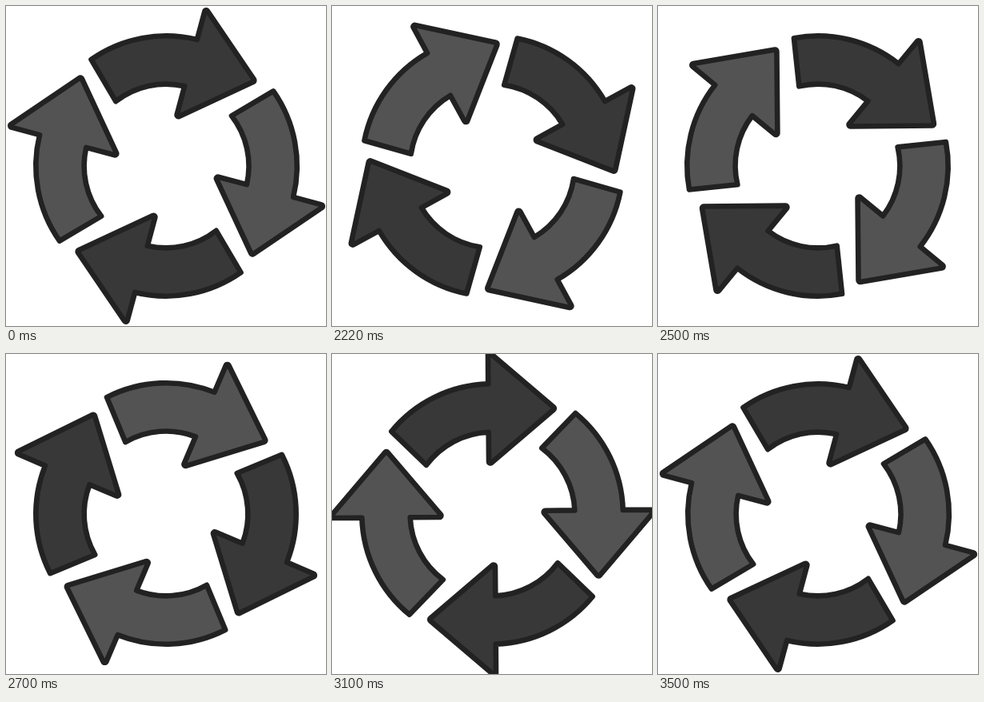
Write an HTML page that moves like this. It is 400 px wide and 400 px high and loops after 3.52 s.

```html
<!DOCTYPE html>
<html lang="en">
<head>
<meta charset="utf-8">
<title>Rotating arrows</title>
<style>
  html, body { margin: 0; width: 100%; height: 100%; overflow: hidden; background: #fff; }
  svg { display: block; width: 100%; height: 100%; }
</style>
</head>
<body>
<svg viewBox="-200 -200 400 400">
  <defs>
    <!-- curved shaft, then a head with softly rounded corners -->
    <path id="arrow" d="M-125.9-103 A162.7 162.7 0 0 1-5.1-162.6
      L-5.4-199.1 A2 2 0 0 1-2.1-200.6 L76.9-133.7 A2 2 0 0 1 76.9-130.7
      L-.8-64.1 A2 2 0 0 1-4.1-65.6 L-4.5-102.3 A102.4 102.4 0 0 0-82.2-61Z"/>
  </defs>
  <g id="ring" stroke="#222" stroke-width="6.6" stroke-linejoin="round" transform="rotate(15.6)">
    <use href="#arrow" fill="#383838"/>
    <use href="#arrow" fill="#535353" transform="translate(1.1 -.3) rotate(90)"/>
    <use href="#arrow" fill="#383838" transform="rotate(180)"/>
    <use href="#arrow" fill="#535353" transform="rotate(270)"/>
  </g>
</svg>
<script>
  const LOOP = 3520, REST = 2000, STEP = 25, STEPS = 60, TILT = 15.6;
  const ring = document.getElementById('ring');

  // Cubic bezier easing (x1, 0, x2, 1), solved by bisection.
  function ease(x, x1 = 0.29, x2 = 0.18) {
    let lo = 0, hi = 1, s = x;
    for (let i = 0; i < 24; i++) {
      s = (lo + hi) / 2;
      const r = 1 - s;
      if (3 * x1 * s * r * r + 3 * x2 * s * s * r + s * s * s < x) lo = s;
      else hi = s;
    }
    return s * s * (3 - 2 * s);
  }

  // The turn advances 40 times a second, on a 10 ms clock.
  function turnAt(t) {
    const i = Math.floor((Math.floor(t / 10) * 10 - REST + 5) / STEP);
    if (i <= 0 || i >= STEPS) return 0;
    return 360 * ease(i / STEPS);
  }

  function draw() {
    const angle = TILT + turnAt(performance.now() % LOOP);
    ring.setAttribute('transform', `rotate(${angle.toFixed(3)})`);
    requestAnimationFrame(draw);
  }
  draw();
</script>
</body>
</html>
```
